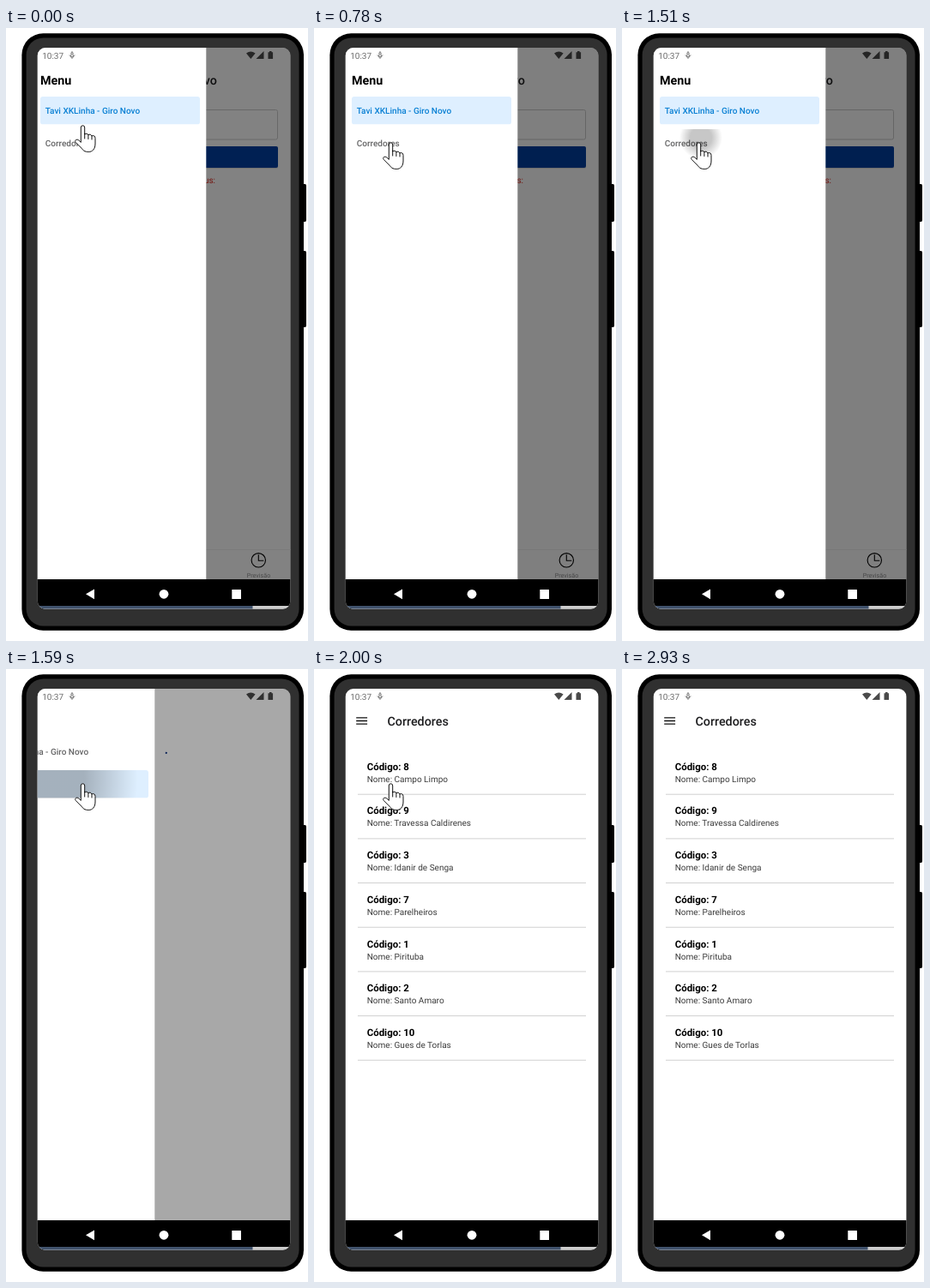
An HTML page that plays this animation: 352x715 px, repeating every 3010 ms.

```html
<!DOCTYPE html>
<html lang="pt">
<head>
<meta charset="utf-8">
<title>Menu e corredores</title>
<style>
  html, body { margin: 0; width: 100%; height: 100%; overflow: hidden; background: #fff; }
  svg { display: block; width: 100%; height: 100%; }
  text { font-family: Roboto, sans-serif; font-size: 10.02px; text-rendering: geometricPrecision; }
  .title { font-size: 14.32px; font-weight: 500; fill: #1c1c1e; }
  .item { font-weight: 500; }
  .code { font-size: 11.45px; font-weight: 700; }
  .name { fill: #3c3c3c; }
  .hairline { stroke: #d0d0d0; }
</style>
</head>
<body>
<svg viewBox="0 0 352 715">
  <defs>
    <clipPath id="screenClip"><rect x="36.800" y="23" width="294.600" height="654.600" rx="9"/></clipPath>
    <clipPath id="itemClip"><rect x="44" y="118" width="186" height="32.500" rx="2.900"/></clipPath>
    <radialGradient id="rippleFill">
      <stop offset=".5"/>
      <stop offset="1" stop-opacity="0"/>
    </radialGradient>
  </defs>

  <path d="M345 182h3.500q1.500 0 1.500 2v40q0 2-1.500 2H345zM345 260h3.500q1.500 0 1.500 2v85q0 2-1.500 2H345z"/>
  <rect x="18.400" y="6.300" width="328.600" height="696.400" rx="25"/>
  <rect x="23.600" y="11.500" width="318" height="686" rx="20" fill="#303030"/>

  <g clip-path="url(#screenClip)">
    <rect x="36" y="23" width="296" height="656" fill="#fff"/>

    <g id="home">
      <text class="title" x="246" y="66" text-anchor="end">Tavi XKLinha - Giro Novo</text>
      <rect x="51.500" y="95.500" width="265" height="34.500" rx="2" fill="none" stroke="#ccc"/>
      <rect x="51" y="138.500" width="266" height="25.500" rx="2" fill="#ddd"/>
      <rect x="51" y="138" width="266" height="25" rx="2" fill="#003ea2"/>
      <text x="244" y="181" text-anchor="end" fill="#e02418">ônibus:</text>
      <path class="hairline" d="M36 608.500H332" stroke-opacity=".35"/>
      <g fill="none" stroke="#000" stroke-width="1.100">
        <circle cx="294.300" cy="620.800" r="8.200"/>
        <path d="M294.300 614.300V621.300H300.300"/>
      </g>
      <text x="294.500" y="641" text-anchor="middle" fill="#8e8e8f" style="font-size:7.160px">Previsão</text>
    </g>

    <g id="header">
      <path d="M49.200 56.900h12.900M49.200 60.500h12.900M49.200 64.100h12.900" stroke="#111" stroke-width="1.430"/>
      <text class="title" x="85.500" y="66">Corredores</text>
    </g>
    <path id="spinner" fill="none" stroke="#062f80" stroke-width="2.100"/>
    <g id="list"></g>

    <g fill="#4a4a4a">
      <path d="M280 29.500Q285.300 25.500 290.600 29.500L285.300 36z"/>
      <path d="M300.500 27V36H291.500z"/>
      <path d="M305.500 28.200h1.500v-1.200h2.600v1.200h1.500V36h-5.600z"/>
    </g>

    <rect id="scrim" x="36" y="23" width="296" height="620"/>
    <g id="drawer">
      <rect x="30" y="23" width="207.300" height="620" fill="#fff"/>
      <text class="title" x="44" y="66" style="font-weight:700;fill:#000">Menu</text>
      <rect id="highlight" x="44" width="186" height="32.300" rx="2.900" fill="#deefff"/>
      <text id="homeItem" class="item" x="49.800" y="100">Tavi XKLinha - Giro Novo</text>
      <text id="corridorItem" class="item" x="49.800" y="138">Corredores</text>
      <g clip-path="url(#itemClip)"><circle id="ripple" cx="92" cy="128" fill="url(#rippleFill)"/></g>
    </g>

    <text x="42.200" y="36" fill="#6c6c6c">10:37</text>
    <g fill="none" stroke="#777">
      <path d="M75.500 30L77 27.500L78.500 30M74 31.500L77 35.500L80 31.500"/>
      <circle cx="77" cy="31.800" r="1.500"/>
    </g>

    <rect x="36" y="643" width="296" height="31"/>
    <g fill="#fff">
      <path d="M93 660.300L103 654.500V666.200z"/>
      <circle cx="184" cy="660.300" r="5.400"/>
      <rect x="263.300" y="655" width="10.700" height="11" rx=".5"/>
    </g>
    <rect x="36" y="674" width="296" height="4" fill="#ccc"/>
    <rect id="progress" x="36" y="674" height="4" fill="#40526c"/>
  </g>

  <g id="cursor" fill="#fff" stroke="#111" stroke-width="1" stroke-linejoin="round" stroke-linecap="round">
    <path d="M7 20V3A2.200 2.200 0 0 1 11.400 3V11Q13.500 9 15.600 11.500Q18 10 19.700 12.800Q23.500 11.800 23.700 15.500V22C23.700 28 20.500 31.500 16 31.500C11 31.500 9.500 29.500 7.500 27L1 20.500C-.8 18 2 16 4.200 17.700z"/>
    <path fill="none" d="M11.400 10V16M15.600 11.500V16.500M19.700 13V17"/>
  </g>
</svg>

<script>
const LOOP = 3010;
const ROW_HEIGHT = 51.68;
const changeTimes = [0, 70, 150, 230, 310, 390, 460, 540, 1430, 1510, 1590, 1660,
  1840, 1920, 2380, 2460, 2530, 2620, 2700, 2780, 2850, 2930];

// Tracks are [time, value] pairs joined by straight lines.
const tracks = {
  cursorX: [[2300, 80.3], [2530, 98.3], [2620, 94], [2850, 58]],
  cursorY: [[0, 113], [540, 133], [2300, 133], [2530, 415.7], [2850, 685]],
  drawerX: [[0, -4], [150, 0], [1510, 0], [1590, -64], [1660, -175], [1840, -201]],
  rippleRadius: [[1350, 0], [1430, 8], [1510, 25], [1590, 126], [1660, 440]],
  rippleOpacity: [[1510, 0.22], [1590, 0.26], [1660, 0.15], [1840, 0]],
  arcStart: [[1590, -88], [1660, -55], [1840, 30]],
  arcEnd: [[1590, -76], [1660, 48], [1840, 190]],
  progressEnd: [[0, 287.5], [2380, 287.5], [2850, 286.5]]
};

const corridors = [[8, 'Campo Limpo'], [9, 'Travessa Caldirenes'], [3, 'Idanir de Senga'],
  [7, 'Parelheiros'], [1, 'Pirituba'], [2, 'Santo Amaro'], [10, 'Gues de Torlas']];

const el = id => document.getElementById(id);
const set = (id, attributes) => {
  for (const key in attributes) el(id).setAttribute(key, attributes[key]);
};
const show = (id, visible) => set(id, { display: visible ? 'inline' : 'none' });

function valueAt(track, t) {
  const next = track.findIndex(([time]) => time > t);
  if (next === 0) return track[0][1];
  if (next < 0) return track[track.length - 1][1];
  const [t0, v0] = track[next - 1], [t1, v1] = track[next];
  return v0 + (v1 - v0) * (t - t0) / (t1 - t0);
}

function arcPath(start, end) {
  const point = degrees => {
    const a = degrees * Math.PI / 180;
    return `${185.5 + 9 * Math.cos(a)} ${106.8 + 9 * Math.sin(a)}`;
  };
  return `M${point(start)}A9 9 0 ${end - start > 180 ? 1 : 0} 1 ${point(end)}`;
}

el('list').innerHTML = corridors.map(([code, name], i) => `
  <g transform="translate(0 ${i * ROW_HEIGHT})">
    <text class="code" x="61.700" y="117.800">Código: ${code}</text>
    <text class="name" x="61.700" y="131.800">Nome: ${name}</text>
    <path class="hairline" d="M51 146.200H317"/>
  </g>`).join('');

function render(time) {
  const t = changeTimes.filter(change => change <= time).pop();
  const at = name => valueAt(tracks[name], t);
  const drawerX = at('drawerX');
  const switched = t >= 1590;
  const activeColor = '#0a80d4', idleColor = '#656566';

  show('home', !switched);
  show('header', t >= 1660);
  show('spinner', switched && t < 1920);
  show('list', t >= 1920);
  show('cursor', t < 2930);

  set('spinner', { d: arcPath(at('arcStart'), at('arcEnd')) });
  set('scrim', { opacity: Math.max(0, (200 + drawerX) / 400) });
  set('drawer', { transform: `translate(${drawerX})` });
  set('highlight', { y: switched ? 118 : 80 });
  set('homeItem', { fill: switched ? idleColor : activeColor });
  set('corridorItem', { fill: switched ? activeColor : idleColor });
  set('ripple', { r: at('rippleRadius'), opacity: at('rippleOpacity') });
  set('progress', { width: at('progressEnd') - 36 });
  set('cursor', { transform: `translate(${at('cursorX')} ${at('cursorY')})` });
}

const startTime = performance.now();
function tick() {
  render((performance.now() - startTime) % LOOP);
  requestAnimationFrame(tick);
}
tick();
</script>
</body>
</html>
```
